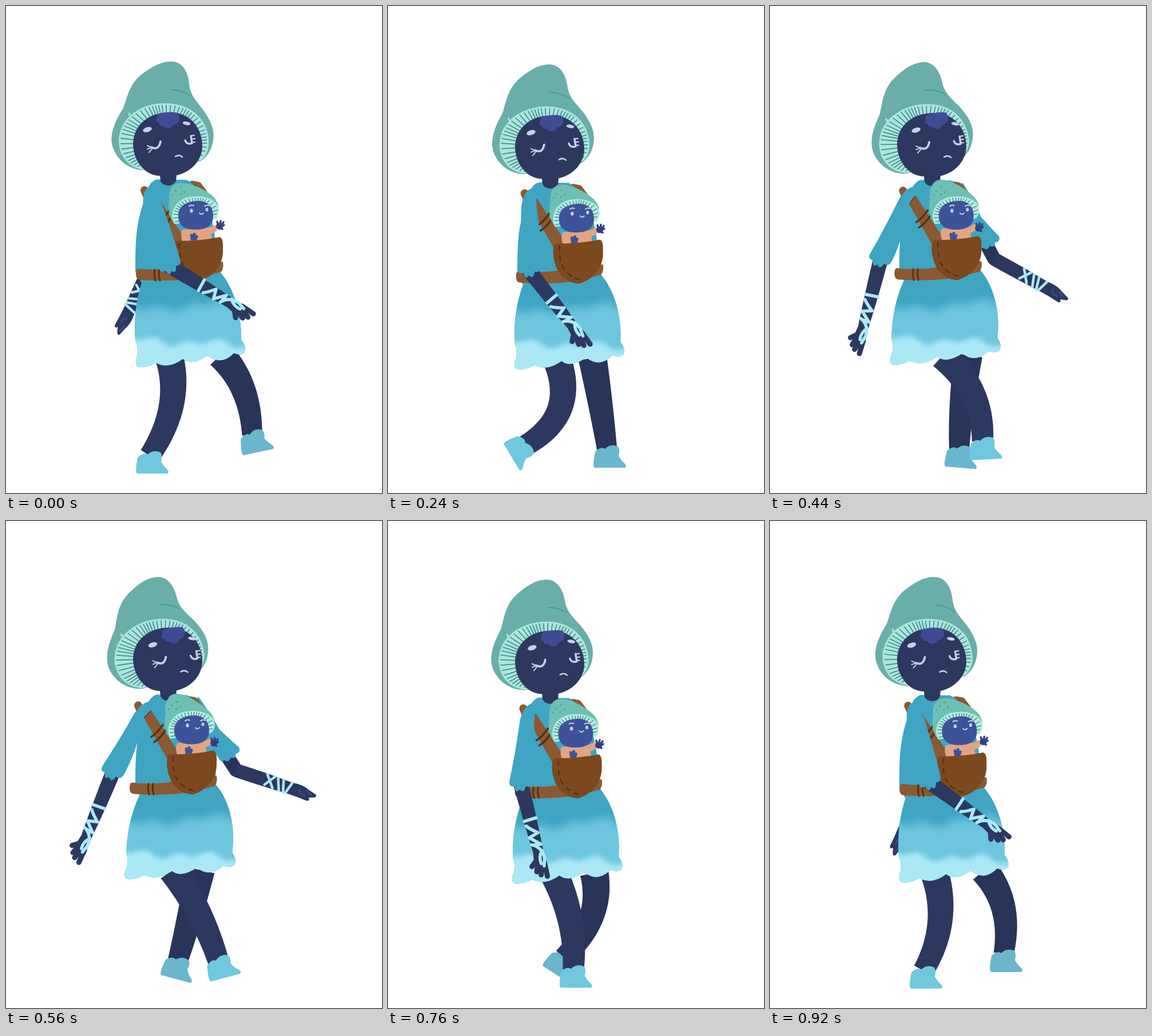
Recreate the animation shown at these times as an HTML page with a canvas. Size 657 by 852 pixels, loop 0.96 s.

```html
<!DOCTYPE html>
<html lang="en">
<head>
<meta charset="utf-8">
<title>Walk cycle</title>
<style>
html, body { margin: 0; width: 100%; height: 100%; overflow: hidden; background: #fff; }
canvas { display: block; }
</style>
</head>
<body>
<canvas id="stage" width="657" height="852"></canvas>
<script>
const ctx = document.getElementById('stage').getContext('2d');
const LOOP = 960, STEP = 40, RAD = Math.PI / 180;
const C = {
  skin: '#2c385f', skinFar: '#283459', dress: '#3fa5c2', mid: '#6ec6de', light: '#abe8f6',
  shoe: '#70c8de', shoeFar: '#69b6ce', hat: '#6aaeaa', rim: '#aae7df', rimLine: '#4a8c8a',
  hair: '#3f4c94', mark: '#c9cfea', strap: '#8b5932', stitch: '#59300f', pocket: '#7c481e',
  babyHat: '#6dc0b3', babyRim: '#b2ece2', babySkin: '#3d5299', babyHand: '#2f4282', peach: '#e3a484'
};

// Pose rows: time, then values. Legs: hip x, knee x/y, ankle x/y, foot angle.
const NEAR_LEG = [
  [0, 284, 289, 698, 251, 787, 0], [160, 290, 290, 705, 225, 768, 60],
  [320, 298, 319, 700, 272, 770, 56], [460, 302, 357, 680, 376, 762, -8],
  [560, 291, 338, 688, 371, 770, -15], [680, 286, 320, 700, 345, 782, 0],
  [840, 293, 317, 700, 299, 787, 0], [920, 286, 297, 700, 268, 787, 0]];
const FAR_LEG = [
  [0, 375, 415, 672, 430, 751, -12], [160, 360, 382, 695, 401, 770, 0],
  [320, 355, 361, 700, 363, 780, 0], [560, 340, 318, 703, 300, 770, 15],
  [680, 347, 331, 697, 277, 762, 38], [840, 372, 385, 690, 357, 767, 22],
  [920, 374, 408, 678, 408, 758, 0]];
// Arms: near upper, near fore, far upper, far fore (degrees from straight down).
const ARMS = [
  [0, 15, 58.7, -27.5, -26], [160, 7.4, 54.8, -8, -12], [320, -13.5, 14.2, 12, 26],
  [520, -31, -23.5, 33, 72.5], [560, -30.2, -22.4, 32.6, 71.3], [680, -20.6, -3.9, 18.6, 49],
  [840, 3.7, 34.7, -8, -2], [920, 11.9, 53.8, -22, -22.6]];
const SWAY = [[0, 0], [40, 0], [160, .14], [320, .5], [520, 1], [560, 1], [680, .75], [840, .25], [920, .06]];

// Cyclic monotone cubic interpolation of pose rows.
function pose(rows, t) {
  const n = rows.length;
  const row = i => {
    const r = rows[(i + n) % n];
    return [r[0] + Math.floor(i / n) * LOOP, ...r.slice(1)];
  };
  let i = n - 1;
  while (rows[i][0] > t) i--;
  const [a, b, c, d] = [row(i - 1), row(i), row(i + 1), row(i + 2)];
  const h = c[0] - b[0], u = (t - b[0]) / h;
  return b.slice(1).map((v, k) => {
    const j = k + 1, slope = (p, q) => (q[j] - p[j]) / (q[0] - p[0]);
    const s0 = slope(a, b), s1 = slope(b, c), s2 = slope(c, d);
    const tangent = (p, q) => p * q <= 0 ? 0 : 2 * p * q / (p + q);
    return v * (1 + 2 * u) * (1 - u) ** 2 + h * tangent(s0, s1) * u * (1 - u) ** 2
      + c[j] * u * u * (3 - 2 * u) + h * tangent(s1, s2) * u * u * (u - 1);
  });
}

const fill = (d, color) => { ctx.fillStyle = color; ctx.fill(new Path2D(d)); };
function stroke(d, color, width) {
  ctx.strokeStyle = color;
  ctx.lineWidth = width;
  ctx.lineCap = ctx.lineJoin = 'round';
  ctx.stroke(new Path2D(d));
}
function oval(x, y, rx, ry, color, deg = 0) {
  ctx.fillStyle = color;
  ctx.beginPath();
  ctx.ellipse(x, y, rx, ry, deg * RAD, 0, 7);
  ctx.fill();
}
function at(x, y, deg, draw) {
  ctx.save();
  ctx.translate(x, y);
  ctx.rotate(deg * RAD);
  draw();
  ctx.restore();
}

function leg([hip, kx, ky, ax, ay, turn], bob, color, shoe, w0, w1) {
  const hy = 610 + bob, cx = 2 * kx - (hip + ax) / 2, cy = 2 * ky - (hy + ay) / 2;
  const left = [], right = [];
  for (let i = 0; i <= 20; i++) {
    const u = i / 20, v = 1 - u, w = (w0 + (w1 - w0) * u) / 2;
    const x = v * v * hip + 2 * u * v * cx + u * u * ax, y = v * v * hy + 2 * u * v * cy + u * u * ay;
    const dx = v * (cx - hip) + u * (ax - cx), dy = v * (cy - hy) + u * (ay - cy), l = Math.hypot(dx, dy);
    left.push([x + dy / l * w, y - dx / l * w]);
    right.unshift([x - dy / l * w, y + dx / l * w]);
  }
  fill('M' + left.concat(right).join('L') + 'Z', color);
  at(ax, ay, turn, () =>
    fill('M-21 3Q-11 -7 -4 -2Q6 -12 19 -6Q23 0 20 10Q24 18 31 24Q35 29 31 31L-22 31Q-25 28 -23 15Z', shoe));
}

// Arm-local axes: x runs down the limb, y points to the back.
const tip = (x, y, deg, len) => [x + len * Math.sin(deg * RAD), y + len * Math.cos(deg * RAD)];

function farArm(upper, fore, bob) {
  const [ex, ey] = tip(325, 315 + bob, upper, 143);
  at(325, 315 + bob, 90 - upper, () => stroke('M60 0L142 0', C.skinFar, 24));
  at(ex, ey, 90 - fore, () => {
    fill('M0 -12Q50 -13 100 -11Q120 -14 132 -8L146 -4Q149 0 143 2L135 5Q141 9 134 11L115 10L96 10Q50 12 0 12Z', C.skin);
    stroke('M54 -11L70 9M55 8L68 -11M74 -11L82 10M84 -11L90 10M100 -10L94 10', C.light, 4.5);
    stroke('M115 -3Q119 6 127 3M128 -5L139 -1', C.hair, 2.5);
  });
  at(325, 315 + bob, 90 - upper, () =>
    fill('M0 -14Q40 -16 67 -14Q92 -20 112 -26Q122 -24 118 -15Q127 -10 119 -4Q126 4 117 8Q118 16 108 14L0 20Z', C.dress));
}

function nearArm(upper, fore, bob) {
  const [ex, ey] = tip(254, 325 + bob * .6, upper, 137);
  at(ex, ey, 90 - fore, () => {
    fill('M-6 -13Q50 -13 122 -9L146 -10Q156 4 145 11L130 11L118 9Q60 12 -6 13Z', C.skin);
    stroke('M140 -6L164 -5M142 0L159 5M138 6L152 11M132 6L141 17', C.skin, 9);
    stroke('M60 -11L61 10M70 9Q76 5 86 -8L91 9L107 -8L105 6M104 8Q112 -9 132 -8L145 -4M118 -7Q128 2 140 0', C.light, 5.5);
  });
  // The armpit opens up as the arm swings back.
  const pit = -7.3 - .31 * upper;
  at(254, 325 + bob * .6, 90 - upper, () =>
    fill(`M-8 6Q0 18 24 20Q80 19 132 22Q143 21 139 12Q153 8 143 2Q151 -6 136 -8Q139 -18 125 -18Q80 -17 22 ${pit}Q-3 -6 -8 6Z`, C.dress));
}

function wave(base, tilt, amp, phase) {
  let d = 'M190 680';
  for (let x = 190; x <= 450; x += 5)
    d += `L${x} ${base + tilt * (x - 320) + amp * Math.sin(x / 9 + phase) + amp * Math.sin(x / 21)}`;
  return d + 'L450 680Z';
}

function dress(sway) {
  fill('M263 303C250 308 245 322 240 344C228 380 226 405 226 465L240 490L362 485Q375 410 352 350Q340 318 316 304Z', C.dress);
  ctx.save();
  const shear = -.098 * sway, squash = 1 - .035 * sway;
  ctx.transform(1, 0, shear, squash, -4 * sway - shear * 465, 465 * (1 - squash));
  ctx.clip(new Path2D('M240 476C229 505 223 540 226 585Q232 598 229 612Q224 624 230 631Q245 634 262 624Q284 636 309 617Q325 630 352 611Q376 630 398 607Q415 613 418 603Q419 593 411 584C412 545 402 495 370 460Z'));
  ctx.fillStyle = C.dress;
  ctx.fillRect(190, 440, 260, 220);
  ctx.filter = 'blur(8px)';
  fill(wave(525, -.08, 4, 0), C.mid);
  ctx.filter = 'blur(5px)';
  fill(wave(588, .05, 4.5, 1), C.light);
  ctx.restore();
}

function harness() {
  fill('M231 459Q260 463 300 458L379 447Q381 458 376 465L340 475Q290 483 234 479Q227 478 227 469Q227 460 231 459Z', C.strap);
  stroke('M260 461Q258 470 261 480M268 461Q266 470 269 480', C.stitch, 3);
  fill('M251 344L264 332L316 412L296 424Z', C.strap);
  stroke('M265 379Q276 372 285 358M270 388Q281 381 290 367', C.stitch, 3.5);
  stroke('M254 344L262 335', C.stitch, 2);
}

function pocket() {
  fill('M296 411Q340 411 373 404Q380 405 379 425Q380 447 366 463Q353 477 337 481Q317 480 303 463Q289 440 293 415Z', C.pocket);
  ctx.setLineDash([8, 9]);
  stroke('M303 415Q302 445 312 457Q322 470 338 474', C.stitch, 2.5);
  ctx.setLineDash([]);
}

// Rim with gill lines fanning out from (cx, cy), stopping short of the edge.
function rim(d, color, cx, cy, from, to, count, width) {
  fill(d, color);
  ctx.save();
  ctx.clip(new Path2D(d));
  for (let i = 0; i < count; i++) {
    const a = (from + (to - from) * (i + .3 * Math.sin(i * 7)) / count) * RAD;
    const x = Math.cos(a), y = Math.sin(a);
    stroke(`M${cx + 20 * x} ${cy + 20 * y}L${cx + 100 * x} ${cy + 100 * y}`, C.rimLine, width);
  }
  stroke(d, color, 3 * width);
  ctx.restore();
}

function babyBody(sway) {
  fill('M308 391L357 387L366 382L369 393L358 399L361 414L310 416Q303 400 308 391Z', C.peach);
  stroke('M325 408L324 401M328 408L329 399M331 409L333 403', C.babySkin, 5);
  at(-sway, 6 * sway, 0, () => {
    oval(373, 385, 6, 6, C.babyHand);
    stroke('M371 384L369 377M374 383L375 376M376 384L380 378M376 386L381 383M375 388L378 390', C.babyHand, 3.5);
  });
}

function babyHead(sway) {
  const top = 310 - 7 * sway;
  fill(`M302 ${top}C318 ${top - 3} 346 318 362 333C373 344 374 358 367 371L297 381C284 374 282 352 286 338C284 325 288 ${top + 1} 302 ${top}Z`, C.babyHat);
  stroke('M296 323h1M305 317h1M291 330h1M311 325h1M304 329h1', '#4da398', 2.5);
  rim('M294 381C286 364 293 344 313 336C336 328 366 335 371 352C373 362 369 369 363 372Z', C.babyRim, 331, 368, 165, 360, 21, 1.4);
  fill('M331 341C350 339 362 349 362 367C362 384 350 391 331 391C312 391 301 384 301 367C301 351 314 342 331 341Z', C.babySkin);
  oval(324, 358, 2.7, 3.4, C.mark);
  oval(351, 356, 2.5, 3.2, C.mark);
  stroke('M320 350Q324 347 328 349M347 350Q351 347 355 349M338 362Q341 366 345 362', C.mark, 2);
}

function head(sway) {
  ctx.save();
  ctx.translate(283 - 6.5 * sway, 245);
  ctx.rotate(-8 * RAD * sway);
  ctx.translate(-283, -245);
  fill('M287 97C305 95 318 112 320 135C322 162 341 172 352 193C362 210 365 225 361 240C357 256 350 264 340 271L240 287C215 286 195 270 187 248C178 222 195 195 205 178C212 160 215 135 240 117C258 104 272 97 287 97Z', C.hat);
  stroke('M290 146Q308 147 322 157', '#40a198', 2);
  rim('M240 286C206 281 192 249 199 222C207 190 240 170 277 170C320 170 352 195 354 235C355 250 350 261 341 269Z', C.rim, 281, 240, 128, 390, 46, 1.8);
  stroke('M215 188L218 195L222 200', C.rim, 3);
  ctx.restore();
  fill('M283 186C320 184 343 212 343 245C343 268 325 290 298 296L297 306Q292 314 283 314Q273 313 270 306L269 297C242 296 222 270 222 240C224 206 250 187 283 186Z', C.skin);
  at(9.5 * sway, 0, 0, () => {
    at(283, 200, -6 * sway, () =>
      fill('M-18 -11Q0 -17 18 -13Q23 -2 18 3Q13 8 9 7Q7 14 1 14Q-6 14 -8 9Q-16 10 -16 4Q-23 2 -20 -3Z', C.hair));
    oval(247, 216, 8, 4.2, C.mark, -18);
    oval(315.5, 205, 7, 3, C.mark, 10);
    stroke('M254 247Q267 253 270 237', C.mark, 3.8);
    stroke('M256 248L247 244M255 250L250 256M253 248L247 250', C.mark, 2);
    stroke('M313 235Q316 243 325 240L323 227', C.mark, 3.4);
    stroke('M323 227L329 226M324 233L330 232M325 238L330 238', C.mark, 2.3);
    stroke('M296 263Q303 259 308 264', C.mark, 2.6);
  });
}

function draw(t) {
  const [sway] = pose(SWAY, t);
  const bob = 2.9 * (1 - Math.cos((t - 30) / 240 * Math.PI));
  const [nearUpper, nearFore, farUpper, farFore] = pose(ARMS, t);
  ctx.fillStyle = '#fff';
  ctx.fillRect(0, 0, 657, 852);

  farArm(farUpper, farFore, bob);
  leg(pose(FAR_LEG, t), bob, C.skinFar, C.shoeFar, 50, 35);
  leg(pose(NEAR_LEG, t), bob, C.skin, C.shoe, 50, 37);
  at(-11 * sway, bob, 0, () => stroke('M242 322L250 341', C.strap, 14));
  at(-7 * sway, bob, 0, () => {
    stroke('M325 311L336 313L346 326', C.strap, 11);
    stroke('M327 313L340 320', C.stitch, 3);
  });
  at(0, bob, 0, () => dress(sway));
  at(-11 * sway, bob - 2 * sway, 0, harness);
  at(-9 * sway, bob - 3 * sway, 0, () => babyBody(sway));
  at(-11 * sway, bob - 3 * sway, 0, pocket);
  at(0, bob, 0, () => head(sway));
  at(-7 * sway, bob - sway, 0, () => babyHead(sway));
  nearArm(nearUpper, nearFore, bob);
}

function tick(now) {
  draw(Math.floor(now / STEP) * STEP % LOOP);
  requestAnimationFrame(tick);
}
tick(0);
</script>
</body>
</html>
```
